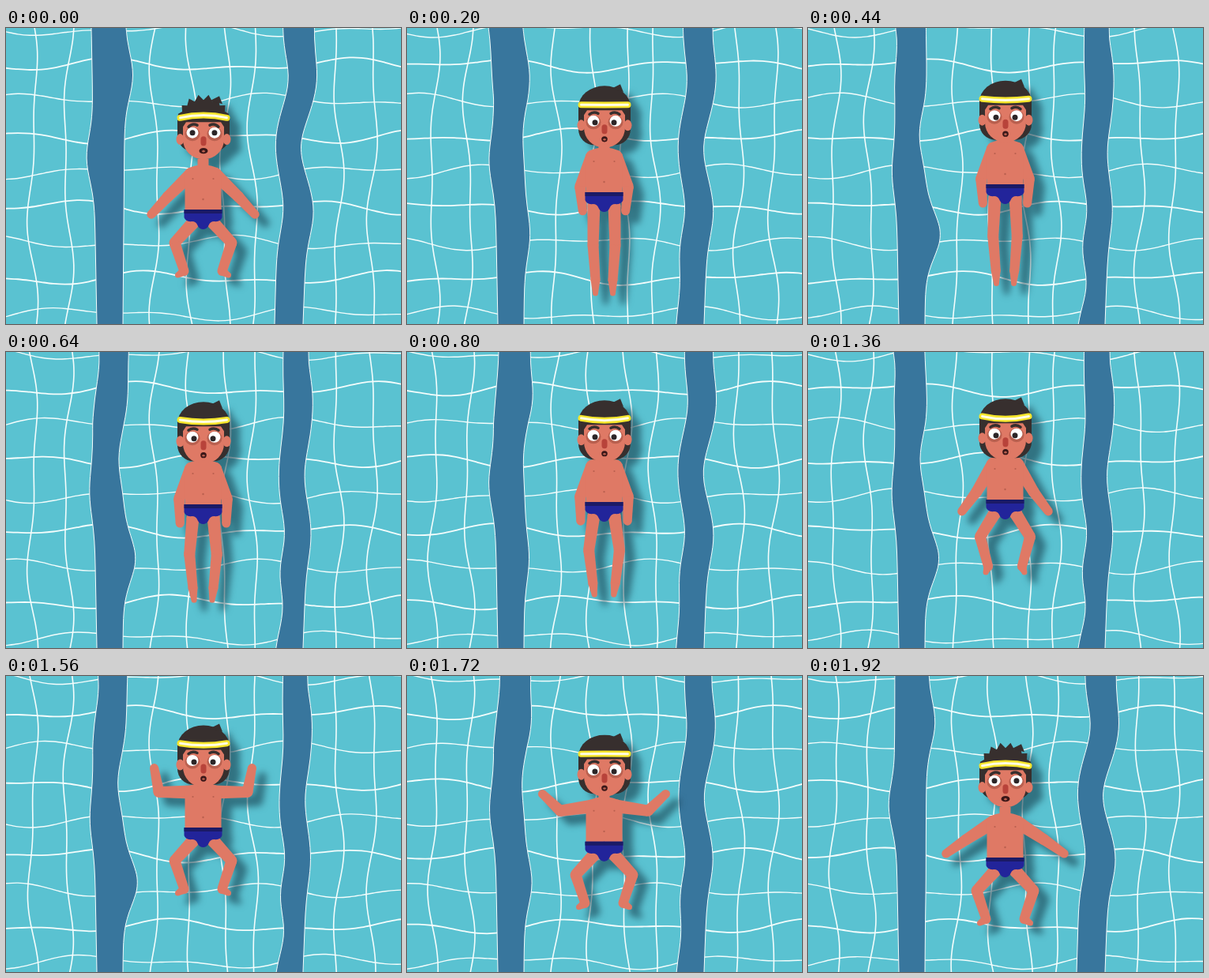
These frames come from a looping animation (500 by 375 pixels, 1960 ms). An HTML page with a canvas:

```html
<!DOCTYPE html>
<html lang="en">
<head>
<meta charset="utf-8">
<title>Backstroke</title>
<style>
  html, body { margin: 0; width: 100%; height: 100%; overflow: hidden; background: #5ac2d1; }
  canvas { position: absolute; left: 0; top: 0; width: 500px; height: 375px; }
  #swimmer { filter: drop-shadow(13px 11px 4px rgba(22, 62, 76, .6)); }
</style>
</head>
<body>
<canvas id="pool" width="500" height="375"></canvas>
<canvas id="swimmer" width="500" height="375"></canvas>
<script>
const W = 500, H = 375, LOOP = 1960, STEP = 40, WAVE = 980;
const { sin, cos, PI } = Math;
const pool = document.getElementById('pool').getContext('2d');
const g = document.getElementById('swimmer').getContext('2d');
const mix = (a, b, k) => a + (b - a) * k;

// Smooth line through points, continuing the current path.
function curve(c, pts) {
  for (let i = 0; i < pts.length - 1; i++) {
    const [p, a, b, q] = [pts[i - 1] || pts[i], pts[i], pts[i + 1], pts[i + 2] || pts[i + 1]];
    c.bezierCurveTo(a[0] + (b[0] - p[0]) / 6, a[1] + (b[1] - p[1]) / 6,
      b[0] - (q[0] - a[0]) / 6, b[1] - (q[1] - a[1]) / 6, b[0], b[1]);
  }
}

function strokeCurve(pts, width) {
  pool.lineWidth = width;
  pool.beginPath();
  pool.moveTo(...pts[0]);
  curve(pool, pts);
  pool.stroke();
}

// Points every 15 px along one axis.
function sample(length, point) {
  return Array.from({ length: length / 15 + 2 }, (_, i) => point(i * 15));
}

// Lane edges: straight lines with bulges [y, size] in calm and swollen water.
const edges = [
  { top: 108, bottom: 115, sway: 7, calm: [[165, -9]], swell: [[15, 6], [185, -5]] },
  { top: 151, bottom: 148, sway: 5, calm: [[60, 10]], swell: [[135, -9], [262, 19]] },
  { top: 350, bottom: 340, sway: 1, calm: [[65, 9], [145, -5], [230, 7]],
    swell: [[95, 3], [232, 9], [325, 11]] },
  { top: 390, bottom: 376, sway: 0, calm: [[65, 6], [150, -11], [235, 8]],
    swell: [[0, -9], [155, -5], [235, 4]] }
];
const bulge = (list, y) =>
  list.reduce((sum, [at, size]) => sum + size * Math.exp(-(((y - at) / 40) ** 2)), 0);

function drawPool(ms) {
  const phase = ms / WAVE * 2 * PI, swollen = (1 - cos(phase)) / 2;

  pool.fillStyle = '#5ac2d1';
  pool.fillRect(0, 0, W, H);
  pool.strokeStyle = '#f4fdfc';

  [34, 78, 189, 234, 277, 313, 420, 464].forEach((x, k) => {
    strokeCurve(sample(H, y => [x
      + 5 * sin(y / 48 + k * 1.7 + .8 * sin(phase))
      + 3 * sin(y / 25 + k + .8 * cos(phase)), y]), 1.6);
  });
  for (let k = 0; k < 9; k++) {
    strokeCurve(sample(W, x => [x, 2 + 45 * k
      + 6 * sin(x / 47 + k * 1.9 + .9 * sin(phase))
      + 4 * sin(x / 25 - k * 1.3 + .8 * cos(phase))]), k % 2 ? 1.8 : 1.4);
  }

  const sides = edges.map(e => sample(H, y => [
    mix(e.top, e.bottom, y / H)
      + mix(bulge(e.calm, y), bulge(e.swell, y), swollen)
      - e.sway * sin(phase) * Math.max(0, 1 - y / 90), y]));
  pool.fillStyle = '#38769d';
  for (const [left, right] of [sides.slice(0, 2), sides.slice(2)]) {
    pool.beginPath();
    pool.moveTo(...left[0]);
    curve(pool, left);
    const back = [...right].reverse();
    pool.lineTo(...back[0]);
    curve(pool, back);
    pool.fill();
    strokeCurve(left, 1);
    strokeCurve(right, 1);
  }
}

// time, waist y, leg bend, upper arm and forearm angle (0 down, 90 outward)
const poses = [
  [0, 230, 1, 46, 43],
  [200, 208, 0, 22, -6],
  [640, 193, .15, 22, -2],
  [1000, 188, .4, 22, 0],
  [1360, 187, .8, 31, 37],
  [1560, 192, 1, 90, 169],
  [1920, 230, 1, 57, 55],
  [LOOP, 230, 1, 46, 43]
];

// Monotone cubic interpolation of one pose column.
function track(col, t) {
  const n = poses.length, time = j => poses[j][0], value = j => poses[j][col];
  let i = 0;
  while (i < n - 2 && t >= time(i + 1)) i++;
  const slope = j => (value(j + 1) - value(j)) / (time(j + 1) - time(j));
  const tangent = j => {
    const a = slope(j ? j - 1 : n - 2), b = slope(j < n - 1 ? j : 0);
    return a * b <= 0 ? 0 : 2 * a * b / (a + b);
  };
  const d = time(i + 1) - time(i), u = (t - time(i)) / d, v = 1 - u;
  return value(i) * v * v * (1 + 2 * u) + value(i + 1) * u * u * (3 - 2 * u)
    + d * u * v * (v * tangent(i) - u * tangent(i + 1));
}

const skin = '#df7965', shade = '#b9604f', hair = '#372f2e';

function ellipse(x, y, rx, ry, color) {
  g.fillStyle = color;
  g.beginPath();
  g.ellipse(x, y, rx, ry, 0, 0, PI * 2);
  g.fill();
}

function box(x, y, w, h, r, color) {
  g.fillStyle = color;
  g.beginPath();
  g.roundRect(x, y, w, h, r);
  g.fill();
}

// Tapered limb through joints given as [x, y, radius].
function limb(joints) {
  joints.forEach(([x, y, r], i) => {
    ellipse(x, y, r, r, skin);
    if (!i) return;
    const [px, py, pr] = joints[i - 1];
    const a = Math.atan2(y - py, x - px) + PI / 2, c = cos(a), s = sin(a);
    g.beginPath();
    g.moveTo(px + c * pr, py + s * pr);
    g.lineTo(x + c * r, y + s * r);
    g.lineTo(x - c * r, y - s * r);
    g.lineTo(px - c * pr, py - s * pr);
    g.fill();
  });
}

// Draws the left half, then its mirror image.
function mirrored(draw) {
  for (const side of [1, -1]) {
    g.save();
    g.scale(side, 1);
    draw();
    g.restore();
  }
}

function drawHead(tilt) {
  const up = Math.min(1, Math.max(0, -tilt)), down = 1 - up;

  box(-33, -6, 66, mix(57, 50, up), [8, 8, 20, 20], hair);
  mirrored(() => ellipse(-29.5, mix(26, 29, up), 5, 7, skin));
  box(-26, 3, 52, 51, [9, 9, 25, 25], skin);

  // crown, ruffled when the head tips back
  g.fillStyle = hair;
  g.beginPath();
  for (let i = 0; i <= 16; i++) {
    const a = PI * (1 + i / 16), ruffle = 1 + up * (i % 2 ? .15 : -.12);
    g.lineTo(33 * cos(a) * (i % 2 ? 1 : ruffle), 3 + 27 * sin(a) * ruffle);
  }
  g.fill();
  g.beginPath();
  g.moveTo(8, -20);
  g.lineTo(20, -26);
  g.lineTo(24, -16);
  g.fill();
  mirrored(() => {
    g.beginPath();
    g.moveTo(-33, 0);
    g.lineTo(-28, 16);
    g.lineTo(-22, 7);
    g.lineTo(0, 7);
    g.lineTo(0, 0);
    g.fill();
  });

  g.strokeStyle = hair;
  g.lineWidth = 3.5;
  g.lineCap = 'round';
  mirrored(() => {
    ellipse(-14, 22, 9.5, 9, shade);
    ellipse(-14, 20.5, 7.5, 7, '#fff');
    ellipse(-14 + 2 * down, 20.5 + 2 * down, 3.5, 3.5, '#2b2527');
    g.beginPath();
    g.moveTo(-19, 12 + up);
    g.quadraticCurveTo(-14, 8, -8, 11);
    g.stroke();
  });
  box(-3.5, 25, 7, 12, 3.5, '#b8433a');
  ellipse(0, 43.5, mix(3.8, 5.5, up), 3.6, '#3a1718');
  ellipse(0, 44, 1.8, 1.3, shade);

  const bow = tilt * 5;
  for (const [color, width] of [['#f6e62c', 8], ['#fffde2', 3]]) {
    g.strokeStyle = color;
    g.lineWidth = width;
    g.beginPath();
    g.moveTo(-29.5, -bow / 3);
    g.quadraticCurveTo(0, bow, 29.5, -bow / 3);
    g.stroke();
  }
}

function drawTrunks() {
  g.fillStyle = '#22249a';
  mirrored(() => {
    g.beginPath();
    g.moveTo(.5, 0);
    g.lineTo(-24, 0);
    g.lineTo(-24, 10);
    g.quadraticCurveTo(-22, 16, -14, 15);
    g.quadraticCurveTo(-9, 15, -7, 20);
    g.quadraticCurveTo(-5, 25, .5, 25);
    g.fill();
  });
  box(-24, 0, 48, 5, 0, '#1b1a66');
}

function drawSwimmer(ms) {
  const [waist, bend, upper, fore] = [1, 2, 3, 4].map(col => track(col, ms));
  const tilt = (209 - waist) / 21.5;
  const reach = ([x, y], deg, length, r) =>
    [x - length * sin(deg * PI / 180), y + length * cos(deg * PI / 180), r];

  g.clearRect(0, 0, W, H);
  g.save();
  g.translate(249.5, waist);

  const shoulder = [-15, -45, 8.5];
  const elbow = reach(shoulder, upper, 41, 7);
  const hand = reach(elbow, fore, 31, 5.5);
  const knee = [mix(-14, -36, bend), mix(67, 42, bend), 7];
  const ankle = [mix(-11, -24, bend), mix(111, 78, bend), 6];
  const toe = [mix(-11, -32, bend * bend), mix(128, 83, bend), 3.5];
  mirrored(() => {
    limb([[-13, 17, 8], knee, ankle, toe]);
    limb([shoulder, elbow, hand]);
    // half of the torso
    g.beginPath();
    g.moveTo(.5, -64);
    g.lineTo(-7, -64);
    g.lineTo(-7, -56);
    g.quadraticCurveTo(-23, -54, -23, -42);
    g.lineTo(-23, 4);
    g.lineTo(.5, 4);
    g.fill();
    ellipse(-13, -39, 1.1, 1, shade);
  });
  ellipse(0, -13, 1.2, 1.2, shade);
  drawTrunks();

  g.translate(.5, 7 * tilt - 111);
  drawHead(tilt);
  g.restore();
}

const start = performance.now();
function frame() {
  const t = Math.floor((performance.now() - start) % LOOP / STEP) * STEP;
  drawPool(t);
  drawSwimmer(t);
  requestAnimationFrame(frame);
}
frame();
</script>
</body>
</html>
```
